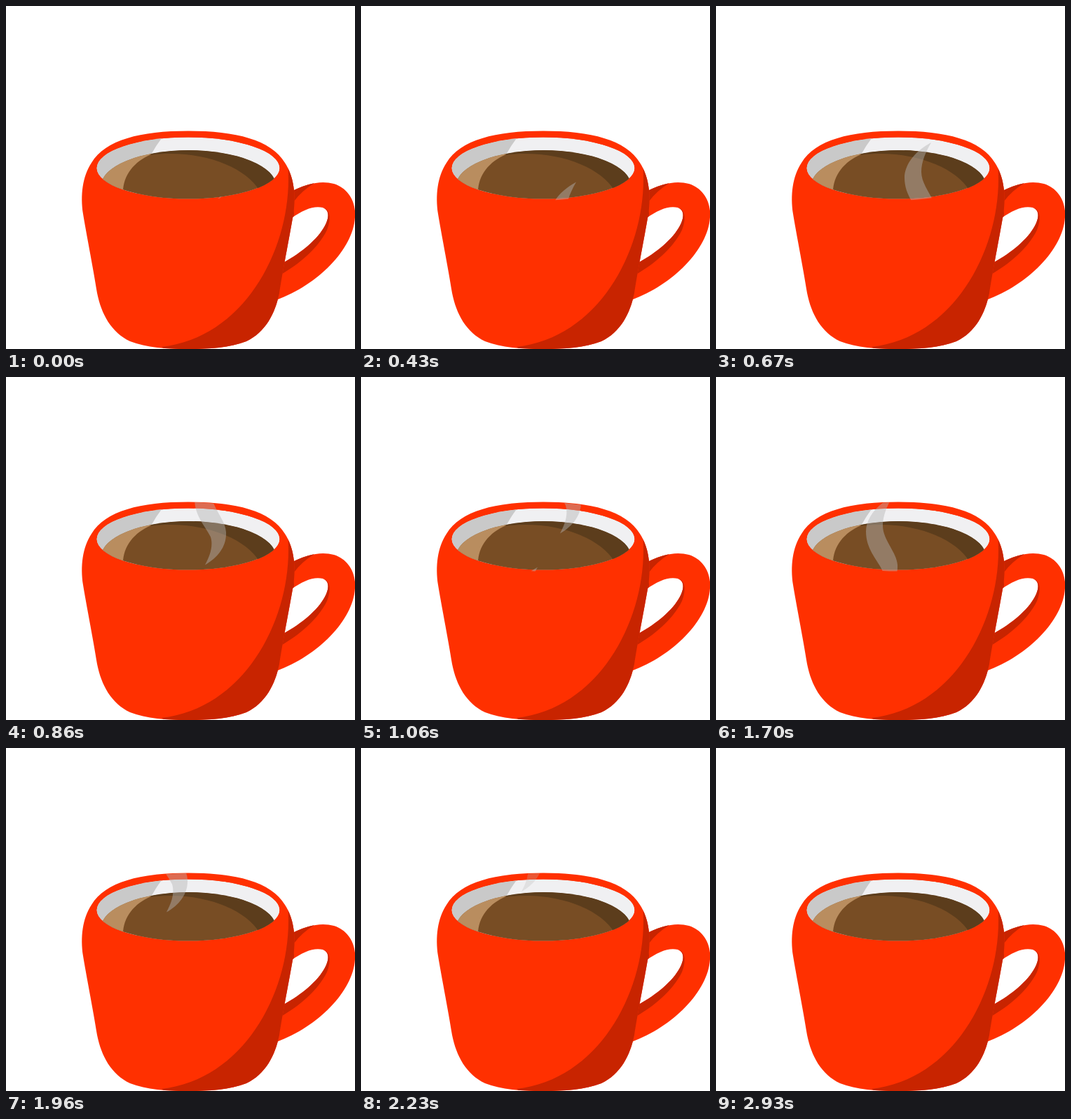
An HTML page for the animation above (2970 ms loop, 498 px wide and 490 px high).

```html
<!DOCTYPE html>
<html>
<head>
<meta charset="utf-8">
<title>Hot coffee</title>
<style>
html, body { margin: 0; width: 100%; height: 100%; overflow: hidden; background: #fff; }
svg { display: block; width: 498px; height: 490px; }
</style>
</head>
<body>
<svg viewBox="0 0 498 490">
  <defs>
    <path id="body" d="M260 178.500C192 178.500 142 191 122 224C109 244 106 270 110 297C114 322 124 372 130 410C136 440 150 466 177 479C200 488 230 490 260 490C290 490 320 488 343 479C370 466 384 440 390 410C396 372 406 322 410 297C414 270 411 244 398 224C378 191 328 178.500 260 178.500Z"/>
    <ellipse id="mouth" cx="260" cy="231.500" rx="130.500" ry="44"/>
    <ellipse id="brew" cx="260.500" cy="257" rx="125" ry="51"/>
    <path id="wisp" d="M0 0C-26 14 -38 34 -38 50C-38 75 -23 89 -15 105C-11 118 -16 132 -23 145C-4 134 8 118 7 98C6 80 -14 62 -14 42C-14 28 -8 14 0 0Z"/>
    <clipPath id="inBody"><use href="#body"/></clipPath>
    <clipPath id="inMouth"><use href="#mouth"/></clipPath>
    <clipPath id="inBrew"><use href="#brew"/></clipPath>
    <clipPath id="steamArea">
      <path d="M112 232A148 53 0 0 1 408 232Z"/>
      <ellipse cx="260" cy="231.500" rx="131" ry="46"/>
    </clipPath>
  </defs>

  <!-- handle -->
  <path fill="#ff3000" fill-rule="evenodd" d="M405 266C430 253 450 249 468 254C488 260 500 280 498 302C495 348 445 398 386 420L380 400ZM406 304C425 290 440 285 452 288C462 292 461 303 455 314C445 333 422 352 397 366Z"/>
  <g fill="#c82400">
    <path d="M405 266Q424 256 440 253Q422 264 411 279L405 306Z"/>
    <path d="M453 288C463 291 464 305 458 320C446 345 420 368 390 385L397 366C422 352 445 333 455 314C461 303 462 292 453 288Z"/>
    <path d="M405 306L411 300V279L400 290Z"/>
  </g>

  <!-- cup -->
  <use href="#body" fill="#ff3000"/>
  <path clip-path="url(#inBody)" fill="#c82400" d="M402 225C412 335 346 473 222 487L240 500H430V225Z"/>

  <!-- inside -->
  <g clip-path="url(#inMouth)">
    <use href="#mouth" fill="#f0f0f2"/>
    <path fill="#c9c9c9" d="M225 185Q214 199 206 214L180 290H100V185Z"/>
    <g clip-path="url(#inBrew)">
      <use href="#brew" fill="#784d24"/>
      <path fill="#5c3d1c" d="M205 213C275 204 340 228 362 264H400V190H205Z"/>
      <path fill="#b98d5f" d="M211 200L207 212C183 222 167 242 167 266V290H110V200Z"/>
    </g>
  </g>

  <g clip-path="url(#steamArea)" fill="#b4b4b4">
    <use class="steam" href="#wisp"/>
    <use class="steam" href="#wisp"/>
  </g>
</svg>
<script>
const LOOP = 2970, RISE_TIME = 1500, RISE = 215;
const starts = [{ x: 307, at: 0 }, { x: 252, at: 965 }];
const wisps = document.querySelectorAll('.steam');
const ease = p => p < 0.5 ? 4 * p ** 3 : 1 - 4 * (1 - p) ** 3;

function draw() {
  const t = performance.now() % LOOP;
  starts.forEach(({ x, at }, i) => {
    const p = (t - at) / RISE_TIME;
    const shown = p >= 0 && p < 1;
    const fade = Math.min(1, (1 - p) / 0.25);
    wisps[i].setAttribute('opacity', shown ? 0.45 * fade : 0);
    if (shown) wisps[i].setAttribute('transform', `translate(${x} ${272 - RISE * ease(p)})`);
  });
  requestAnimationFrame(draw);
}
draw();
</script>
</body>
</html>
```
